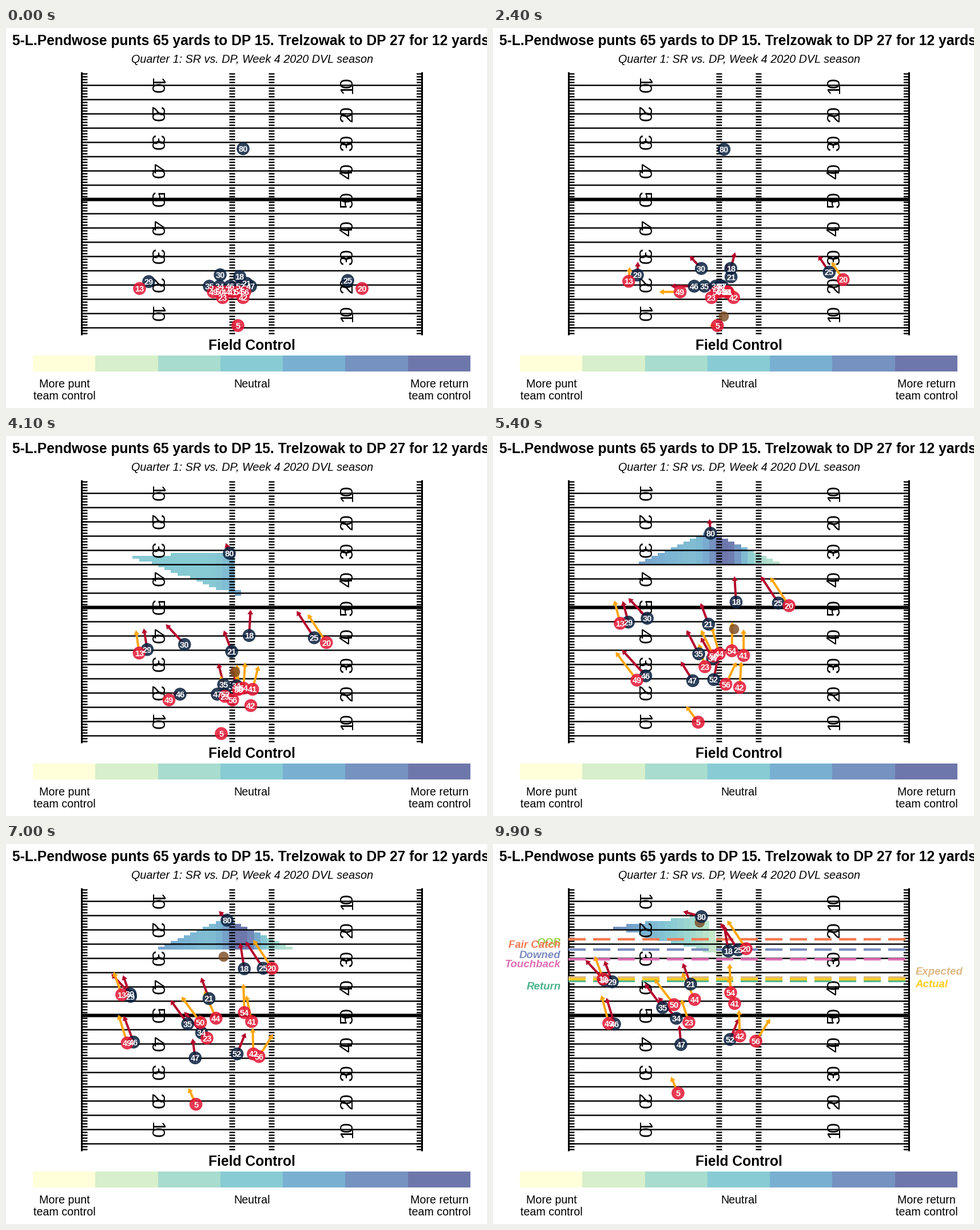
A matplotlib script that plays this animation: 841x666 px, repeating every 10000 ms.

```python
import numpy as np
import matplotlib.pyplot as plt
from matplotlib.animation import FuncAnimation
from matplotlib.collections import PolyCollection
from matplotlib.colors import LinearSegmentedColormap

W, H, DPI = 841, 666, 64
PT = 72 / DPI
LEFT, RIGHT, MID = 132, 727, 429.7
YARD_X, YARD_Y = 11.16, 5.0
FRAMES, STEP = 100, 100

# Game clock in seconds; it runs in slow motion once the ball comes down.
SNAP, CONTROL_AT, SLOW_AT, END = 1.5, 3.4, 7.0, 7.69

RED, NAVY = "#e31837", "#0c2340"
ORANGE, CRIMSON = "#ffa60f", "#b5062c"
PALETTE = ["#ffffd9", "#d7efca", "#a8dccf", "#88cbd4",
           "#79b0d2", "#7592c1", "#6e77ab"]
CMAP = LinearSegmentedColormap.from_list("control", PALETTE)

plt.rcParams["font.family"] = "Liberation Sans"
fig = plt.figure(figsize=(W / DPI, H / DPI), dpi=DPI, facecolor="white")
ax = fig.add_axes([0, 0, 1, 1])
ax.axis("off")


def label(x, y, text, size, **kw):
    kw = {"ha": "center", "va": "baseline", **kw}
    return ax.text(x, y, text, fontsize=size * PT, **kw)


def rule(ys, x0, x1, width):
    ax.hlines(ys, x0, x1, colors="black", linewidth=width * PT,
              zorder=2, snap=False)


def draw_field():
    ax.vlines([LEFT, RIGHT], 77, 538, colors="black", linewidth=3 * PT,
              zorder=2, snap=False)
    rule(np.arange(100, 526, 25), LEFT, RIGHT, 2.4)
    rule([300], LEFT, RIGHT, 6)
    for x in (LEFT, 390, 459, RIGHT - 9.5):
        rule(np.arange(80, 536, 5), x, x + 10, 2.4)
    for i in range(9):
        tens = str(5 - abs(4 - i))
        y = 100.5 + 50 * i
        for x, turn, side in ((261, 270, 1), (597, 90, -1)):
            for digit, shift in ((tens, -YARD_Y), ("0", YARD_Y)):
                label(x, y + side * shift, digit, 32, rotation=turn,
                      va="center", zorder=2)


def draw_captions():
    label(10.5, 29.5, "5-L.Pendwose punts 65 yards to DP 15. "
          "Trelzowak to DP 27 for 12 yards", 24.6, weight="bold", ha="left")
    label(MID, 60.5, "Quarter 1: SR vs. DP, Week 4 2020 DVL season", 19.7,
          style="italic")
    label(MID, 563.5, "Field Control", 24.6, weight="bold")
    cell = (812 - 47) / len(PALETTE)
    for i, color in enumerate(PALETTE):
        ax.add_patch(plt.Rectangle((46.5 + i * cell, 573), cell, 28.5,
                                   color=color, lw=0))
    label(MID, 629.5, "Neutral", 19.6)
    for x, word in ((101.5, "punt"), (757.5, "return")):
        label(x, 629.5, "More " + word, 19.6)
        label(x, 650.5, "team control", 19.6)


# A pace is when a player sets off and how long the run-up to full speed takes.
SPRINT, BLOCK, LATE = (1.4, 1.6), (3.2, 1.0), (4.1, 1.2)


def covered(t, pace):
    """Share of the run done: steady acceleration, then constant speed."""
    def distance(u, ramp):
        u = max(u, 0)
        return u * u / (2 * ramp) if u < ramp else u - ramp / 2
    start, ramp = pace
    return distance(t - start, ramp) / distance(END - start, ramp)


class Player:
    def __init__(self, number, start, end, pace=SPRINT, bend=0):
        self.number, self.pace, self.bend = number, pace, bend
        self.start, self.end = np.array(start, float), np.array(end, float)

    def at(self, t):
        sway = np.sin(np.pi * max(t - SNAP, 0) / (END - SNAP))
        run = (self.end - self.start) * covered(t, self.pace)
        return self.start + run + [self.bend * sway, 0]


class Waypoints:
    """Straight moves between a few (time, x, y) points."""

    def __init__(self, number, *points):
        self.number = number
        self.times, self.xs, self.ys = np.array(points).T

    def at(self, t):
        return np.array([np.interp(t, self.times, self.xs),
                         np.interp(t, self.times, self.ys)])


def line_up(x, step, y, *men):
    """Players in an evenly spaced row; each man is number, end, pace, bend."""
    return [Player(number, (x + step * i, y), end, pace, bend)
            for i, (number, end, pace, bend) in enumerate(men)]


returner = Waypoints(80, (1.5, 414, 211), (3.2, 394, 213), (4.1, 390, 205),
                     (5.4, 380, 170), (7.0, 386, 133), (8.0, 354, 124))
ball = Waypoints(None, (1.2, 393, 462), (1.7, 405, 516), (2.5, 402, 503),
                 (4.1, 400, 412), (5.4, 421, 337), (END, 361, 136))
returning = [
    returner,
    Player(29, (249, 444), (208, 241), bend=12),
    Player(25, (597, 442), (428, 185)),
    Player(30, (374, 432), (194, 238)),
    Player(18, (408, 435), (411, 187), bend=16),
    Player(21, (420, 447), (345, 245)),
    *line_up(355, 18, 452,
             (35, (296, 286), BLOCK, 32), (34, (320, 305), BLOCK, 36),
             (46, (212, 315), LATE, -90), (52, (414, 342), LATE, -27),
             (47, (328, 351), LATE, -60)),
]
kicking = [
    Player(13, (233, 456), (192, 236), bend=14),
    Player(20, (622, 456), (442, 183)),
    Player(5, (405, 521), (323, 436), LATE, -30),
    *line_up(362, 11, 462,
             (49, (202, 314), LATE, -80), (50, (316, 281), BLOCK, 40),
             (44, (352, 272), BLOCK, 27), (41, (422, 279), BLOCK, 34),
             (54, (415, 260), BLOCK, 8), (56, (459, 345), LATE, -22)),
    *line_up(378, 36, 472,
             (23, (342, 312), BLOCK, 8), (42, (431, 336), LATE, 14)),
]
players = returning + kicking


def velocity(player, t, h=0.15):
    return (player.at(t + h) - player.at(t - h)) / (2 * h)


def arrow(p, v):
    """Outline of an arrow reaching one second ahead."""
    size = np.hypot(*v)
    if size < 6:
        return np.repeat(p[None], 7, axis=0)
    u = v / size
    n = np.array([-u[1], u[0]])
    neck, tip = p + v - 8 * u, p + v
    return np.array([p + 2 * n, neck + 2 * n, neck + 5 * n, tip,
                     neck - 5 * n, neck - 2 * n, p - 2 * n])


# Field control: one-yard cells inside a wedge in front of the returner.
COLS, ROWS, GRID_X, GRID_Y = 53, 40, 132, 100
cell_x = GRID_X + (np.arange(COLS) + 0.5) * YARD_X
cell_y = GRID_Y + (np.arange(ROWS) + 0.5) * YARD_Y


def control(t, apex):
    opened = np.clip((t - 4.1) / 1.3, 0, 1)
    caught = np.clip((t - SLOW_AT) / (END - SLOW_AT), 0, 1)
    axis = np.radians(40 * (1 - opened) + 29 * caught)

    px = cell_x - apex[0]
    dx = px[None, :] / YARD_X
    dy = (cell_y - apex[1])[:, None] / YARD_Y
    along = dy * np.cos(axis) - dx * np.sin(axis)
    across = dy * np.sin(axis) + dx * np.cos(axis)
    inside = (np.abs(across) <= along + 0.4) & (along <= 10.7 - 0.4 * caught)

    peak = 3.5 * (0.4 + 0.6 * opened) * (1 - caught)
    level = (3 - 1.2 * caught - (0.012 * opened + 0.01 * caught) * px
             + peak * np.exp(-((px - 27) / 32) ** 2))
    rgba = np.repeat(CMAP(np.clip(level / 6, 0, 1))[None], ROWS, axis=0)
    rgba[..., 3] = inside
    return rgba


class Outcome:
    """Dashed yard line with its label; drift ties it to the returner."""

    def __init__(self, name, color, y, shift=8, drift=0.5, right=False):
        self.y, self.shift, self.drift = y, shift, drift
        self.line, = ax.plot([LEFT, RIGHT], [y, y], color=color, lw=4.3 * PT,
                             ls=(0, (7, 3)), dash_capstyle="butt", zorder=4)
        self.text = label(738 if right else 118, y, name, 18.6, color=color,
                          weight="bold", style="italic", va="center_baseline",
                          ha="left" if right else "right", zorder=4)

    def update(self, shown, y80):
        y = self.y + self.drift * (y80 - 127)
        self.line.set_ydata([y, y])
        self.text.set_y(y + self.shift)
        self.line.set_visible(shown)
        self.text.set_visible(shown)


def dots(count, diameter, color, **kw):
    return ax.scatter([0] * count, [0] * count, s=(diameter * PT) ** 2,
                      color=color, **kw)


draw_field()
draw_captions()
tiles = ax.imshow(np.zeros((ROWS, COLS, 4)), aspect="auto", zorder=1,
                  interpolation="nearest",
                  extent=(GRID_X, GRID_X + COLS * YARD_X,
                          GRID_Y + ROWS * YARD_Y, GRID_Y))
outcomes = [
    Outcome("OOB", "#9bd052", 167, shift=4.5),
    Outcome("Fair Catch", "#f57a55", 167),
    Outcome("Downed", "#7b8cc0", 185),
    Outcome("Touchback", "#e06cb4", 201, drift=0),
    Outcome("Return", "#4fb38c", 240),
    Outcome("Expected", "#deb887", 234, shift=-12, right=True),
    Outcome("Actual", "#ffcd1e", 236, drift=0, right=True),
]
teams = [len(returning), len(kicking)]
arrows = PolyCollection([], linewidths=0, zorder=5,
                        facecolors=np.repeat([CRIMSON, ORANGE], teams))
ax.add_collection(arrows)
ball_dot = dots(1, 17, "#7a4a21", alpha=0.8, lw=0.8, zorder=6)
discs = dots(len(players), 21.5, np.repeat([NAVY, RED], teams),
             alpha=0.86, lw=PT, zorder=7)
numbers = [label(0, 0, str(p.number), 14.5, color="white", weight="bold",
                 va="center_baseline", zorder=8) for p in players]
# Whole coordinates fall on pixel centres.
ax.set_xlim(-0.5, W - 0.5)
ax.set_ylim(H - 0.5, -0.5)


def update(frame):
    now = frame * STEP / 1000
    slow = max(now - SLOW_AT, 0) / (9.9 - SLOW_AT)
    t = min(now, SLOW_AT) + slow * (END - SLOW_AT)
    spots = np.array([p.at(t) for p in players])
    discs.set_offsets(spots)
    arrows.set_verts([arrow(s, velocity(p, t)) for s, p in zip(spots, players)])
    for text, spot in zip(numbers, spots):
        text.set_position(spot)
    ball_dot.set_offsets([ball.at(t)])
    tiles.set_visible(now >= CONTROL_AT)
    tiles.set_data(control(t, spots[0]))
    for outcome in outcomes:
        outcome.update(now > SLOW_AT, spots[0][1])
    return []


anim = FuncAnimation(fig, update, frames=FRAMES, interval=STEP, repeat=True,
                     repeat_delay=0, init_func=lambda: update(0))
plt.show()
```
